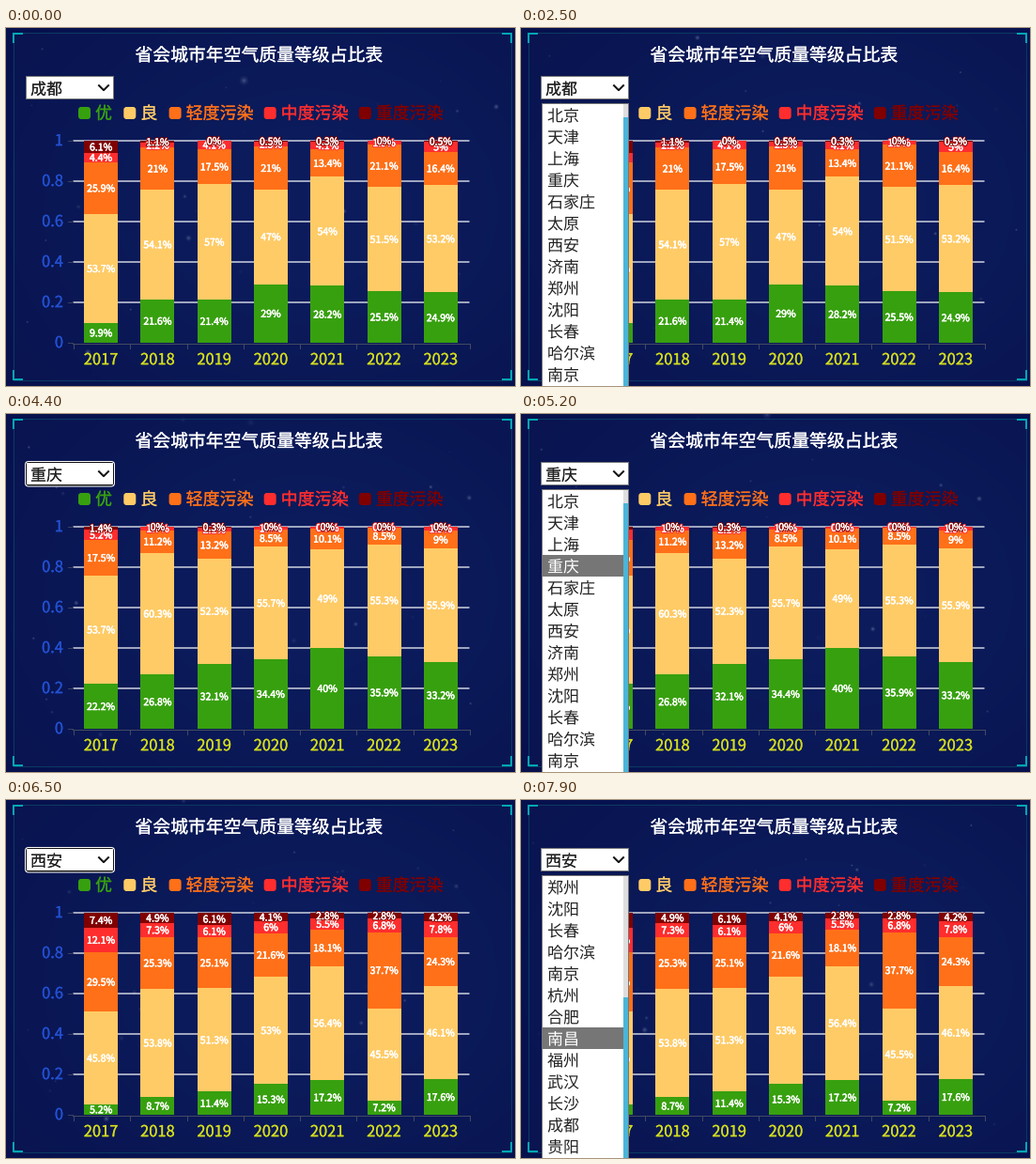
Animation, 542 px wide and 381 px high, one loop 8 s. Source, as a matplotlib script:

```python
import numpy as np
import matplotlib.pyplot as plt
from matplotlib.animation import FuncAnimation
from matplotlib.patches import FancyBboxPatch, Rectangle
from matplotlib.patheffects import Normal, Stroke

W, H, DPI = 542, 381, 100
STEP, FRAMES = 100, 80
PX = 72 / DPI
FONT = "Noto Sans CJK JP"

LEVELS = ["优", "良", "轻度污染", "中度污染", "重度污染"]
COLORS = ["#37a00f", "#ffcb66", "#ff7018", "#ff2d2d", "#800000"]
CITIES = ("北京 天津 上海 重庆 石家庄 太原 西安 济南 郑州 沈阳 长春 哈尔滨 南京 杭州 合肥 "
          "南昌 福州 武汉 长沙 成都 贵阳 昆明").split()
# Percent per year for every level but the fourth, which takes the rest
SHARES = {
    "成都": [[9.9, 21.6, 21.4, 29, 28.2, 25.5, 24.9],
           [53.7, 54.1, 57, 47, 54, 51.5, 53.2],
           [25.9, 21, 17.5, 21, 13.4, 21.1, 16.4],
           [6.1, 1.1, 0, 0.5, 0.3, 0, 0.5]],
    "重庆": [[22.2, 26.8, 32.1, 34.4, 40, 35.9, 33.2],
           [53.7, 60.3, 52.3, 55.7, 49, 55.3, 55.9],
           [17.5, 11.2, 13.2, 8.5, 10.1, 8.5, 9],
           [1.4, 0, 0.3, 0, 0, 0, 0]],
    "西安": [[5.2, 8.7, 11.4, 15.3, 17.2, 7.2, 17.6],
           [45.8, 53.8, 51.3, 53, 56.4, 45.5, 46.1],
           [29.5, 25.3, 25.1, 21.6, 18.1, 37.7, 24.3],
           [7.4, 4.9, 6.1, 4.1, 2.8, 2.8, 4.2]],
}
# (time in ms, city chosen) and (opened, closed)
PICKS = [(-5000, "成都"), (3900, "重庆"), (5858, "西安")]
OPENS = [(2300, 3900), (4900, 5858), (6700, 9000)]

LEFT, RIGHT, TOP, BASE = 71, 493, 120, 335
SLOT = (RIGHT - LEFT) / 7
MIDS = LEFT + SLOT * (np.arange(7) + 0.5)
ROW, LIST_TOP = 23, 81.5

fig = plt.figure(figsize=(W / DPI, H / DPI), dpi=DPI)
ax = fig.add_axes([0, 0, 1, 1])
ax.axis("off")


def text(x, y, s, size, color, ha="left", z=5, bold=0.25, outline=None):
    effects = [Stroke(linewidth=bold * PX, foreground=color), Normal()]
    if outline:
        effects.insert(0, Stroke(linewidth=2.4 * PX, foreground=outline))
    return ax.text(x, y + 0.37 * size, s, fontsize=size * PX, color=color, ha=ha,
                   va="baseline", family=FONT, zorder=z, path_effects=effects)


def rect(x0, y0, x1, y1, color, z):
    return ax.add_patch(Rectangle((x0, y0), x1 - x0, y1 - y0, fc=color, lw=0, zorder=z))


def rounded(x0, y0, x1, y1, color, z, r):
    return ax.add_patch(FancyBboxPatch((x0, y0), x1 - x0, y1 - y0, fc=color, lw=0, zorder=z,
                                       boxstyle=f"round,pad=0,rounding_size={r}"))


def line(xs, ys, color, width=1, z=2, **kw):
    ax.plot(xs, ys, color=color, lw=width * PX, zorder=z, **kw)


def backdrop():
    yy, xx = np.mgrid[0:H, 0:W]
    glow = np.exp(-((xx - 320) / 360) ** 2 - ((yy - 190) / 280) ** 2)[..., None]
    rgb = np.array([5, 14, 72]) + glow * np.array([4, 11, 18])
    rgb[5:375, 7:538] += 3
    ax.imshow(rgb / 255, extent=(0, W, H, 0), aspect="auto", zorder=0)
    ax.set(xlim=(0, W), ylim=(H, 0))


def panel():
    line([7.5, 537.5, 537.5, 7.5, 7.5], [4.5, 4.5, 374.5, 374.5, 4.5], "#0b3a62")
    for x, dx in ((8, 1), (538, -1)):
        for y, dy in ((6, 1), (374, -1)):
            line([x + 10 * dx, x, x], [y, y, y + 10 * dy], "#02a6b5", 2,
                 solid_joinstyle="miter", solid_capstyle="butt")


def chart_frame():
    text(269.5, 28, "省会城市年空气质量等级占比表", 18.85, "white", "center")
    x = 77
    for name, color in zip(LEVELS, COLORS):
        rounded(x, 84, x + 13, 97, color, 4, 3)
        text(x + 18, 90, name, 18, color)
        x += 30.7 + 17.6 * len(name)
    for k in range(6):
        y = BASE - k * (BASE - TOP) / 5
        if k:
            line([LEFT + 0.5, RIGHT + 0.5], [y, y], "#dfe2ea", 1.4, snap=False,
                 solid_capstyle="butt")
        line([LEFT - 5, LEFT], [y, y], "#3a4160")
        text(61, y - 1, f"{k / 5:g}", 16.5, "#2350d2", "right")
    line([LEFT, RIGHT], [335.5, 335.5], "#444a60", z=4)
    for k, x in enumerate(MIDS):
        text(x, 352, str(2017 + k), 16.5, "#d2dc1e", "center")
    for k in range(8):
        x = round(LEFT + k * SLOT) + 0.5
        line([x, x], [336, 341], "#444a60")


backdrop()
panel()
chart_frame()

# Drifting stars
rng = np.random.default_rng(11)
N = 34
star_pos = rng.uniform([10, 10], [W - 10, H - 10], (N, 2))
star_vel = rng.normal(0, 5, (N, 2))
star_r = 0.8 + 2.4 * rng.random(N) ** 3
star_phase = rng.uniform(0, 2 * np.pi, N)
halos = [ax.scatter(*star_pos.T, s=(2 * star_r * k * PX) ** 2, color="#8fa0c0", lw=0, zorder=1)
         for k in (0.5, 1, 1.6)]


def draw_stars(t):
    twinkle = 0.16 * (0.55 + 0.45 * np.sin(star_phase + t / 900))
    for halo, weight in zip(halos, (1.6, 1, 0.6)):
        halo.set_offsets(star_pos + star_vel * t / 1000)
        halo.set_alpha(twinkle * weight)


# Stacked bars with labels
bars, labels = [], []
for s, color in enumerate(COLORS):
    for x in MIDS:
        bars.append(rect(x - 18, BASE, x + 18, BASE, color, 5 + s / 10))
        labels.append(text(x, 0, "", 10.5, "white", "center", 6 + s / 10, 0.5, color))


def cubic_in_out(p):
    p = np.clip(p, 0, 1)
    return 4 * p ** 3 if p < 0.5 else 1 - 4 * (1 - p) ** 3


def cubic_out(p):
    return 1 - (1 - np.clip(p, 0, 1)) ** 3


def shares(city):
    rows = np.array(SHARES[city])
    return np.insert(rows, 3, np.round(100 - rows.sum(axis=0), 1), axis=0)


def draw_bars(t):
    i = max(k for k, (start, _) in enumerate(PICKS) if t >= start)
    start, city = PICKS[i]
    new, old = shares(city), shares(PICKS[max(i - 1, 0)][1])
    low, low0 = (np.cumsum(v, axis=0) - v for v in (new, old))
    move, grow = cubic_in_out((t - start) / 300), cubic_out((t - start) / 1000)
    # Empty segments grow afresh in place; the others glide
    fresh = old == 0
    bottom = np.where(fresh, low, low0 + (low - low0) * move)
    height = np.where(fresh, new * grow, old + (new - old) * move)
    unit = (BASE - TOP) / 100
    for bar, label, b, h, v in zip(bars, labels, bottom.flat, height.flat, new.flat):
        bar.set_y(BASE - b * unit)
        bar.set_height(-h * unit)
        label.set_y(BASE - (b + h / 2) * unit + 0.37 * 10.5)
        label.set_text(f"{v:g}%")
    return city


# Select box
ring = [rounded(20, 50, 116, 77.5, "white", 10, 4),
        rounded(21, 51, 115, 76.5, "#101010", 10.1, 3)]
plain = rect(21, 51, 115, 76, "#767676", 10.2)
rect(22, 52, 114, 75, "white", 10.3)
chosen = text(26, 64.5, "", 17, "#222222", z=11, bold=0)
line([99, 104, 109], [61.2, 66.2, 61.2], "#111111", 2, 11)

# Drop-down list
popup = [rect(22, 80, 115, H, "#767676", 20), rect(23, 81, 114, H, "white", 20.1)]
hover = rect(23, 0, 109, ROW, "#767676", 21)
track = rect(109, 81, 114, H, "#dedede", 22)
thumb = rect(109, 95, 114, H + 5, "#4bb5d8", 22.1)
items = [text(28, 0, name, 17, "#222222", z=23) for name in CITIES]
for part in items + [hover]:
    part.set_clip_path(popup[1])
    part.set_clip_on(True)


def ramp(t, t0, t1, a, b):
    return a + (b - a) * np.clip((t - t0) / (t1 - t0), 0, 1)


def hovered(t, scroll):
    if t < 2600:
        return CITIES.index("成都")
    if t < PICKS[1][0]:
        return int(ramp(t, 2600, 3200, 0, 3))
    if t < PICKS[2][0]:
        return int(ramp(t, 5100, 5600, 3, 6))
    return int((ramp(t, 7100, 7500, 224, 254) + scroll - LIST_TOP) // ROW)


def draw_list(t):
    is_open = any(a <= t < b for a, b in OPENS)
    for part in popup + [hover, track, thumb]:
        part.set_visible(is_open)
    scroll = ramp(t, 7068, 7900, 0, 184)
    active = hovered(t, scroll)
    for k, item in enumerate(items):
        y = LIST_TOP + 11.5 + k * ROW - scroll
        color = "white" if k == active else "#222222"
        item.set_y(y + 0.37 * 17)
        item.set_visible(is_open and 70 < y < H + 12)
        item.set_color(color)
        item.set_path_effects([Normal()])
    hover.set_y(LIST_TOP - 0.5 + active * ROW - scroll)
    thumb.set_y(95 + 0.625 * scroll)
    focused = not is_open and t >= PICKS[1][0]
    for part in ring:
        part.set_visible(focused)
    plain.set_visible(not focused)


def draw(i):
    t = i * STEP
    draw_stars(t)
    chosen.set_text(draw_bars(t))
    draw_list(t)
    return []


anim = FuncAnimation(fig, draw, frames=FRAMES, interval=STEP, repeat=True, repeat_delay=0)
plt.show()
```
